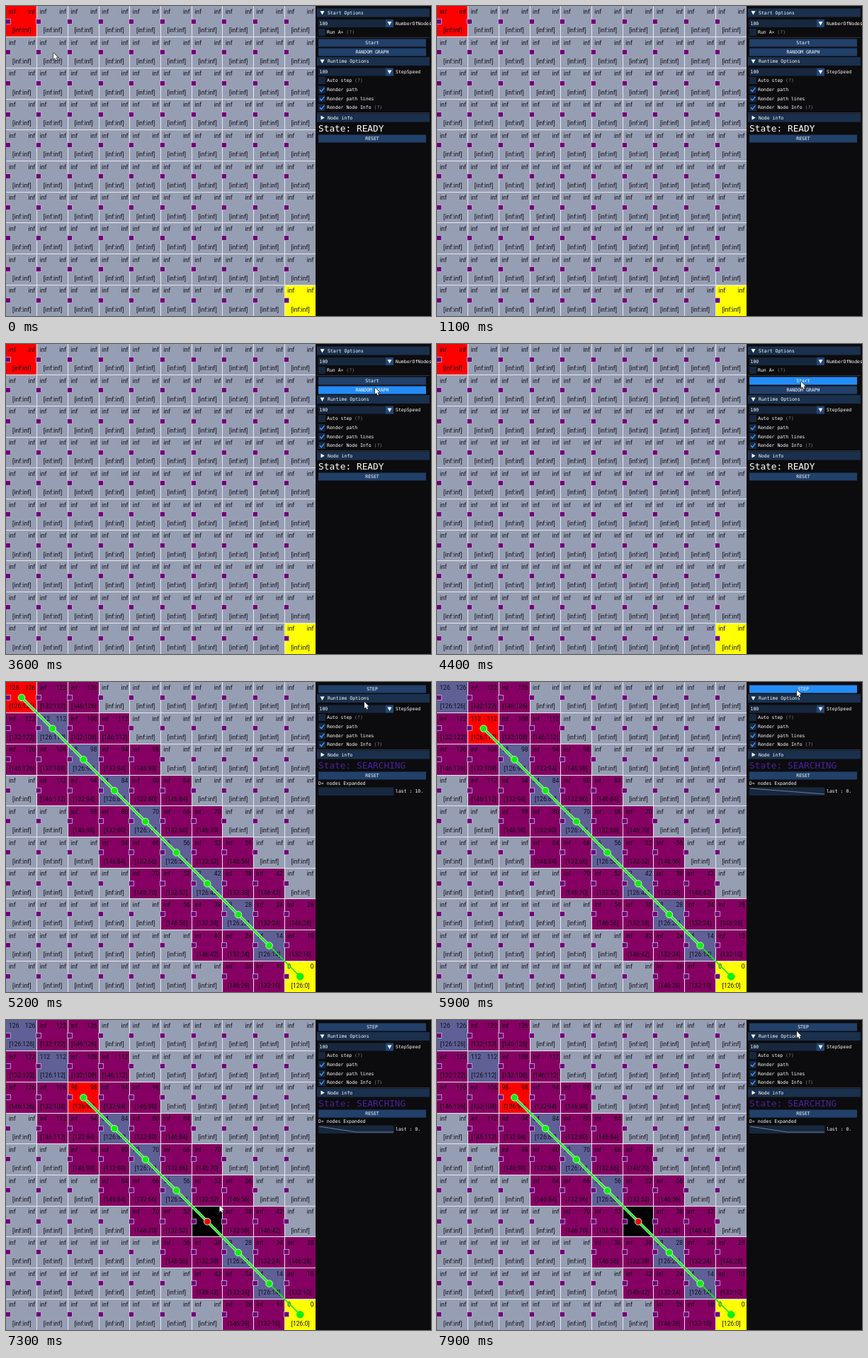
Animation, 600 px wide and 437 px high, one loop 8000 ms. Source, as an HTML page with a canvas:

```html
<!DOCTYPE html>
<html lang="en">
<head>
<meta charset="utf-8">
<title>Path search</title>
<style>
html, body { margin: 0; height: 100%; overflow: hidden; background: #0c0c0e; }
canvas { display: block; }
</style>
</head>
<body>
<canvas id="stage" width="600" height="437"></canvas>
<script>
const ctx = document.getElementById('stage').getContext('2d');
const LOOP = 8000, N = 10, CELL = 43.7;
const START = 4500, STEPS = [5700, 6100], BLOCK = 7100;
const BLOCKED = 6;
const GRID_FONT = '8.6px Roboto, sans-serif';
const MONO = '"DejaVu Sans Mono", monospace';

// Pointer tip: time, x, y; it leaves the stage for a while
const POINTER = [
  [0, 67, 66], [300, 67, 66], [900, 610, 130], [2100, 610, 130], [2500, 569, 121],
  [2900, 569, 121], [3800, 514, 53], [4500, 514, 53], [5200, 506, 28],
  [5500, 508, 11], [6200, 508, 11], [6700, 250, 246], [7000, 285, 281],
  [7200, 285, 281], [7800, 508, 16], [8000, 508, 16]
];

function pointerAt(t) {
  const i = POINTER.findIndex(p => p[0] > t);
  const [t0, x0, y0] = POINTER[i - 1], [t1, x1, y1] = POINTER[i];
  const u = (t - t0) / (t1 - t0), e = u * u * (3 - 2 * u);
  return { x: x0 + (x1 - x0) * e, y: y0 + (y1 - y0) * e };
}

function box(x, y, w, h, color) {
  ctx.fillStyle = color;
  ctx.fillRect(x, y, w, h);
}

function text(s, x, y, color, font, align = 'left') {
  ctx.font = font;
  ctx.textAlign = align;
  ctx.textBaseline = 'middle';
  ctx.fillStyle = color;
  ctx.fillText(s, x, y);
}

function label(s, x, y, color = '#fff', align) {
  text(s, x, y + .4, color, '6.5px ' + MONO, align);
}

function line(points, color, width) {
  ctx.beginPath();
  points.forEach(([x, y]) => ctx.lineTo(x, y));
  ctx.strokeStyle = color;
  ctx.lineWidth = width;
  ctx.stroke();
}

function polygon(points, color) {
  ctx.beginPath();
  points.forEach(([x, y]) => ctx.lineTo(x, y));
  ctx.closePath();
  ctx.fillStyle = color;
  ctx.fill();
}

// Cost labels and fill of one cell
function cellInfo(r, c, s) {
  const d = Math.abs(r - c), m = Math.min(r, c);
  const info = { g: 'inf', h: 'inf', key: '[inf:inf]', fill: '#969eb3' };
  if (s.searching && d < 3) {
    info.h = [126, 122, 126][d] - 14 * m;
    info.key = `[${[126, 132, 146][d]}:${info.h}]`;
    info.fill = d ? '#850062' : '#5e6096';
    if (!d) info.g = info.h;
  }
  if (d === 0) {
    if (r === s.pos) info.fill = '#f00';
    else if (r === N - 1) info.fill = '#ff0';
    else if (r === BLOCKED && s.blocked) info.fill = '#000';
  }
  return info;
}

function drawGrid(s) {
  for (let r = 0; r < N; r++) for (let c = 0; c < N; c++)
    box(c * CELL, r * CELL, CELL + .3, CELL + .3, cellInfo(r, c, s).fill);
  for (let i = 1; i <= N; i++) {
    const p = Math.floor(i * CELL);
    box(p, 0, 1, 437, '#e8e8ee');
    box(0, p, 437, 1, '#e8e8ee');
  }
  for (let r = 0; r < N; r++) for (let c = 0; c < N; c++) {
    const x = c * CELL, y = r * CELL, info = cellInfo(r, c, s);
    text(info.g, x + 4, y + 8.5, '#100c14', GRID_FONT);
    text(info.h, x + 41.3, y + 8.5, '#100c14', GRID_FONT, 'right');
    text(info.key, x + 22.3, y + 34.8, '#100c14', GRID_FONT, 'center');
    const sx = Math.floor(x) - .5, sy = Math.floor(y) + 18.5;
    box(sx, sy, 7, 7, '#6e0078');
    ctx.strokeStyle = '#c8b4d2';
    ctx.lineWidth = .8;
    ctx.strokeRect(sx, sy, 7, 7);
  }
}

function drawPath(s) {
  const mid = i => [i * CELL + 22, i * CELL + 22];
  const main = [mid(s.pos), mid(N - 2)];
  line(main, '#e2f5e2', 4);
  line(main, '#1fe61f', 2.4);
  line([mid(N - 2), mid(N - 1)], '#1fe61f', 1.8);
  for (let i = s.pos; i < N; i++) {
    ctx.beginPath();
    ctx.arc(...mid(i), 4.8, 0, 7);
    ctx.fillStyle = i === BLOCKED && s.blocked ? '#e80808' : '#0cf00c';
    ctx.fill();
    ctx.strokeStyle = i === N - 1 ? '#0cf00c' : '#c8ecc8';
    ctx.lineWidth = 1;
    ctx.stroke();
  }
}

function button(name, y, p) {
  const over = p.x >= 441 && p.x <= 593 && p.y >= y - 5 && p.y <= y + 5;
  box(441, y - 5.5, 152, 11, over ? '#238cf5' : '#21406a');
  label(name, 517, y, '#fff', 'center');
}

function triangle(x, y, down) {
  polygon(down ? [[x - 3, y - 2.5], [x + 3, y - 2.5], [x, y + 3]]
               : [[x - 2, y - 3], [x + 3.2, y], [x - 2, y + 3]], '#fff');
}

function header(name, y, open) {
  box(439, y - 6, 159, 12, '#1a304d');
  triangle(446.5, y, open);
  label(name, 454, y);
}

function combo(name, y) {
  box(441, y - 5.5, 96, 11, '#17273e');
  box(536, y - 5.5, 11, 11, '#234878');
  triangle(541.5, y, true);
  label('100', 442.5, y);
  label(name, 550, y);
}

function checkbox(name, y, on, hint) {
  box(441, y - 5, 10, 10, '#17273e');
  if (on) line([[443, y], [445.3, y + 2.6], [449.3, y - 2.6]], '#4296fa', 1.5);
  label(name, 453, y);
  if (hint) label('(?)', 453 + (name.length + 1) * 3.91, y, '#85858a');
}

function separator(y) {
  box(439, y, 159, 1, '#33333c');
}

function drawPlot(s) {
  label('D∗ nodes Expanded', 441, 142.5);
  box(441, 148.5, 106.5, 11.5, '#17273e');
  const values = [10, 0, 0].slice(0, s.pos + 1), n = values.length - 1;
  if (n) line(values.map((v, i) => [442 + 105 * i / n, 158 - v * .8]), '#8d949f', .8);
  label(`last : ${values[n]}.`, 550, 154);
}

function drawPanel(s, p) {
  box(437, 0, 163, 437, '#0c0c0e');
  const dy = s.searching ? -55 : 0;
  if (s.searching) {
    button('STEP', 10, p);
  } else {
    header('Start Options', 9.5, true);
    combo('NumberOfNodes', 24.5);
    checkbox('Run A∗', 37, false, true);
    separator(44);
    button('Start', 52, p);
    button('RANDOM GRAPH', 65, p);
  }
  header('Runtime Options', 78 + dy, true);
  combo('StepSpeed', 93 + dy);
  checkbox('Auto step', 105 + dy, false, true);
  checkbox('Render path', 118 + dy, true);
  checkbox('Render path lines', 130.5 + dy, true);
  checkbox('Render Node Info', 143 + dy, true, true);
  separator(150 + dy);
  header('Node info', 157.5 + dy, false);
  text('State: ' + (s.searching ? 'SEARCHING' : 'READY'), 441, 174 + dy,
    s.searching ? '#4a22a0' : '#fff', '12.8px ' + MONO);
  button('RESET', 187 + dy, p);
  if (s.searching) drawPlot(s);
}

function drawPointer({ x, y }) {
  const shape = [[0, 0], [0, 9], [2, 7.2], [3.5, 10.5], [5, 9.8], [3.6, 6.6], [6.3, 6.4]]
    .map(([a, b]) => [x + a, y + b]);
  line([...shape, shape[0]], '#222', 1.4);
  polygon(shape, '#fff');
}

function frame(now) {
  const t = Math.floor(now % LOOP / 100) * 100;
  const state = {
    searching: t >= START,
    pos: STEPS.filter(time => t >= time).length,
    blocked: t >= BLOCK
  };
  const pointer = pointerAt(t);
  drawGrid(state);
  if (state.searching) drawPath(state);
  drawPanel(state, pointer);
  drawPointer(pointer);
  requestAnimationFrame(frame);
}
requestAnimationFrame(frame);
</script>
</body>
</html>
```
